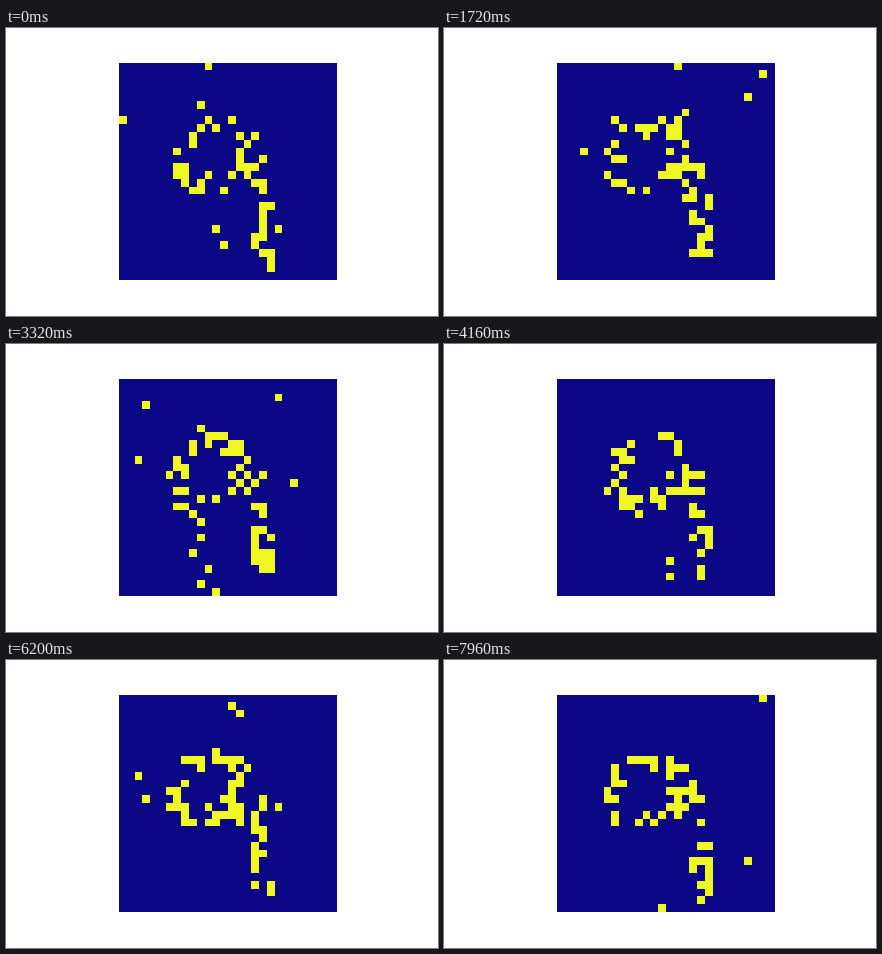
A matplotlib script for the animation above (8 s loop, 432x288 px).

```python
import numpy as np
import matplotlib.pyplot as plt
from matplotlib.animation import FuncAnimation

SIZE = 28
STEPS = 200
INTERVAL = 40
PEAK, NOISE = 0.47, 0.011


def firing_rates():
    """Spike probability per cell: a handwritten nine over faint noise."""
    y, x = np.mgrid[:SIZE, :SIZE]

    # Loop: an ellipse leaning 45 degrees to the right.
    dx, dy = x - 11.1, y - 11.6
    u, v = (dx - dy) / np.sqrt(2), (dx + dy) / np.sqrt(2)
    loop = 4 * np.abs(np.hypot(u / 4.5, v / 3.5) - 1)

    # Stem: a nearly upright line, joined to the loop by a small knot.
    stem = np.hypot(x - 17.2 - 0.085 * (y - 12), y - np.clip(y, 12, 25))
    knot = np.hypot(x - 16.3, y - 13.5) - 0.7

    dist = np.minimum(np.minimum(loop, stem), knot)
    return np.maximum(PEAK * np.clip(1.7 - dist, 0, 1), NOISE)


RATES = firing_rates()


def spikes(step):
    rng = np.random.default_rng(step)
    return (rng.random(RATES.shape) < RATES).astype(float)


fig = plt.figure(figsize=(6, 4), dpi=72, facecolor="white")
ax = fig.add_axes([0.125, 0.125, 0.775, 0.755])
ax.axis("off")
image = ax.imshow(spikes(0), cmap="plasma", vmin=0, vmax=1,
                  interpolation="nearest")


def update(step):
    image.set_data(spikes(step))
    return [image]


anim = FuncAnimation(fig, update, frames=STEPS, interval=INTERVAL,
                     repeat=True, repeat_delay=0, blit=False)
plt.show()
```
